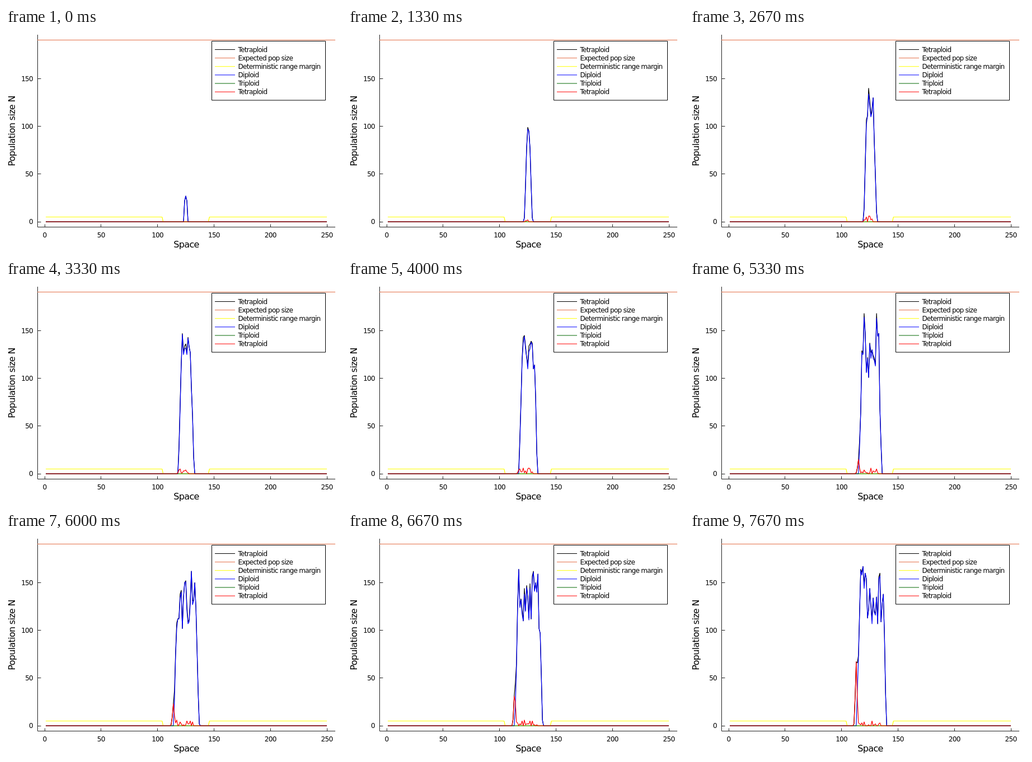
Recreate the animation shown at these times as an HTML page. Size 600 px wide and 400 px high, loop 8000 ms.

```html
<!DOCTYPE html>
<html lang="en">
<head>
<meta charset="utf-8">
<title>Population range</title>
<style>
html, body { margin: 0; width: 100%; height: 100%; overflow: hidden; background: #fff; }
svg { display: block; }
text { font: 12px "DejaVu Sans", sans-serif; letter-spacing: -0.7px; }
.title { font-size: 16px; }
path, polyline, rect { fill: none; stroke: #000; stroke-linejoin: round; }
polyline { stroke-width: 1.2; }
</style>
</head>
<body>
<svg id="plot" width="600" height="400" viewBox="0 0 600 400"></svg>
<script>
const svg = document.getElementById("plot");
const cells = 251, steps = 24;
const orange = "#e36f47", green = "#060", axis = "#222";
const px = i => 69 + 2.016 * i;
const py = n => 346 - 1.703 * n;

function add(tag, attrs, text = "") {
  const el = document.createElementNS("http://www.w3.org/2000/svg", tag);
  for (const key in attrs) el.setAttribute(key, attrs[key]);
  el.textContent = text;
  return svg.appendChild(el);
}
const line = (d, stroke) => add("path", { d, style: `stroke:${stroke}` });
const label = (x, y, text, anchor = "start", more = {}) =>
  add("text", { x, y, "text-anchor": anchor, ...more }, text);

const series = rule => Array.from({ length: cells }, (_, i) => rule(i));
const points = list =>
  list.map((v, i) => `${px(i).toFixed(2)},${py(v).toFixed(2)}`).slice(1).join(" ");
const curve = (stroke, list = []) =>
  add("polyline", { style: `stroke:${stroke}`, points: points(list) });

function random(i, k) {
  const s = Math.sin(i * 12.9898 + k * 78.233) * 43758.5453;
  return s - Math.floor(s);
}

// The range widens, its plateau saturates and gets rougher,
// while tetraploids grow exponentially at the left edge.
function generation(k) {
  const p = k / (steps - 1);
  const left = 123 - 13 * Math.sin(p * Math.PI / 2) ** 1.4;
  const right = 127 + 13 * p;
  const dipLeft = left + Math.min(3, k / 5);
  const peak = 27 + 148 * (1 - Math.exp(-k / 6));
  const slope = Math.min(4, 1.5 + k / 2);
  const rough = Math.min(0.4, k / 40);
  const colony = 67 * Math.exp((k - steps + 1) / 4.6);

  const diploid = series(i => {
    const depth = Math.min(i - dipLeft, right - i) / slope;
    const rise = Math.sin(Math.min(1, Math.max(0, depth)) * Math.PI / 2) ** 1.5;
    return Math.round(peak * rise * (1 - rough * random(i, k)));
  });
  const tetra = series(i => {
    const edge = colony * Math.exp(-(((i - left - 3) / 1.1) ** 2));
    const inside = i > left + 3 && i < right - 4;
    const stray = inside ? 6 * Math.min(1, k / 4) * random(i, k + 50) ** 2 : 0;
    return Math.round(Math.max(edge, stray));
  });
  const total = diploid.map((v, i) => v + tetra[i]);
  return [total, diploid, tetra].map(points);
}

// Axes
line("M56.5 12V355.5H588", axis);
for (let n = 0; n <= 150; n += 50) {
  line(`M56 ${Math.floor(py(n)) + 0.5}h6.5`, axis);
  label(48, py(n) + 4.3, n, "end");
}
for (let i = 0; i < cells; i += 50) {
  line(`M${Math.floor(px(i)) + 0.5} 355.5v-5`, axis);
  label(px(i), 374.3, i, "middle");
}
label(322, 391.8, "Space", "middle", { class: "title" });
label(0, 0, "Population size N", "middle",
  { class: "title", transform: "translate(16 184) rotate(-90)" });

// Curves, back to front
const black = curve("#000");
line("M56 21.5H588", orange);
curve("yellow", series(i => i < 105 || i > 145 ? 5 : 0));
const blue = curve("blue");
curve(green, series(() => 0));
const red = curve("red");

// Legend
add("rect", { x: 367.5, y: 23.5, width: 203, height: 105.5, style: "fill:#fff" });
[["Tetraploid", "#000"], ["Expected pop size", orange],
  ["Deterministic range margin", "yellow"], ["Diploid", "blue"],
  ["Triploid", green], ["Tetraploid", "red"]].forEach(([name, color], j) => {
  const y = 38.5 + 15.12 * j;
  line(`M373 ${y}H409`, color);
  label(414.5, y + 4.3, name);
});

const frames = Array.from({ length: steps }, (_, k) => generation(k));
let shown = -1;
function draw() {
  // 24 generations in 8 s, switching on whole hundredths of a second
  const ticks = Math.floor(performance.now() % 8000 / 10);
  const k = Math.floor((ticks * 3 + 1) / 100);
  if (k !== shown) {
    shown = k;
    [black, blue, red].forEach((el, j) => el.setAttribute("points", frames[k][j]));
  }
  requestAnimationFrame(draw);
}
draw();
</script>
</body>
</html>
```
